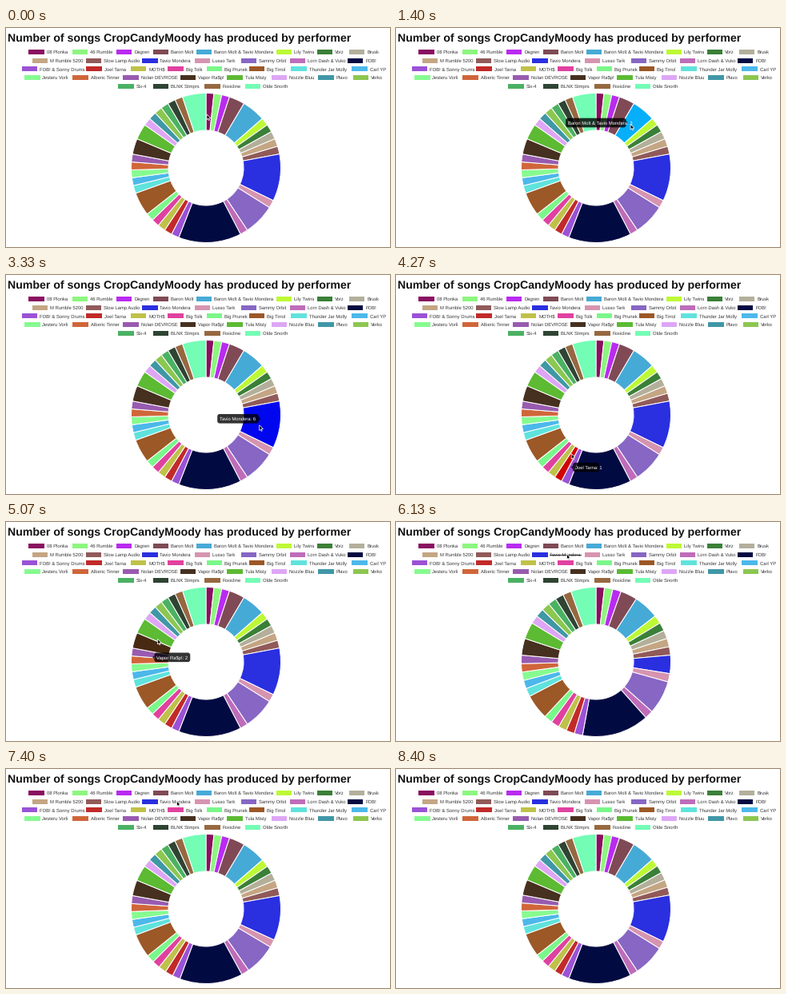
Animation, 480 px wide and 274 px high, one loop 8670 ms. Source, as a matplotlib script:

```python
import colorsys

import matplotlib.pyplot as plt
import numpy as np
from matplotlib.animation import FuncAnimation
from matplotlib.colors import to_rgb
from matplotlib.patches import FancyBboxPatch, Polygon, Rectangle, Wedge

plt.rcParams["font.family"] = "Liberation Sans"
plt.rcParams["text.hinting"] = "no_hinting"

W, H, DPI = 480, 274, 100
LOOP, STEP = 8670, 30
FRAMES = LOOP // STEP

CX, CY, R_OUT, R_IN = 250, 175, 93.5, 47
UNIT = 0.485  # stage pixels per chart pixel
FONT = 12 * UNIT
BOX_W, TEXT_DX = 40 * UNIT, 46 * UNIT
TIP_H, TIP_PAD, CARET, TIP_GAP = 24 * UNIT, 6 * UNIT, 5 * UNIT, 7 * UNIT

# name, colour, songs, left edge of the legend box
ROWS = [
    [("08 Plonka", "#8a1060", 1, 28.3), ("46 Rumble", "#8df67f", 1, 83.0),
     ("Dagren", "#b92bf0", 1, 137.9), ("Baron Molt", "#7f4a55", 2, 183.5),
     ("Baron Molt & Tavio Mondera", "#46aad6", 3, 237.9),
     ("Lily Twins", "#bdf935", 1, 337.8), ("Vorz", "#3a8038", 1, 388.6),
     ("Brusk", "#b3af9a", 1, 429.0)],
    [("M Rumble 5200", "#c4a684", 1, 32.7),
     ("Slow Lamp Audio", "#905a58", 1, 100.0),
     ("Tavio Mondera", "#2a2fe0", 6, 170.1),
     ("Lusso Tark", "#d694b0", 1, 235.8), ("Sammy Orbit", "#8766c4", 4, 294.0),
     ("Lorn Dash & Vuko", "#bf6cba", 1, 354.7), ("FOB!", "#020a42", 8, 426.9)],
    [("FOB! & Sonny Drums", "#9a52d6", 1, 19.6),
     ("Joel Tarna", "#c22a2a", 1, 100.2), ("MOTH$", "#bfc14a", 1, 155.9),
     ("Big Tolk", "#e0419f", 1, 202.2), ("Big Prunek", "#7af78a", 1, 250.7),
     ("Big Tirrol", "#9c5826", 3, 303.8),
     ("Thunder Jar Molly", "#5fe3dc", 1, 356.2),
     ("Carl YP", "#4cb8ea", 1, 432.2)],
    [("Jesteru Vorli", "#86fb90", 1, 23.1),
     ("Alberic Tinner", "#d0663a", 1, 83.3),
     ("Nolan DEVROSE", "#985bb0", 1, 146.4),
     ("Vapor Ra$p!", "#46301f", 2, 217.9), ("Tula Misty", "#5cba33", 2, 276.2),
     ("Nozzle Bluu", "#dea6f5", 1, 331.5), ("Plavo", "#4097a6", 1, 390.1),
     ("Verko", "#8cc751", 1, 433.8)],
    [("Six-4", "#4bb163", 1, 140.4), ("BLNK Stmprs", "#2f4433", 1, 183.8),
     ("Foxicline", "#966840", 1, 248.1), ("Olde Snorth", "#73fdb5", 3, 298.9)],
]
ITEMS = [item for row in ROWS for item in row]
SONGS = np.array([item[2] for item in ITEMS], float)
TOGGLED = 10
HIDE_AT, SHOW_AT = 5910, 6850

# time, x, y of the pointer tip
PATH = np.array([
    (0, 251, 108), (70, 251, 108), (530, 268, 110), (670, 268, 110),
    (730, 271, 111), (870, 271, 111), (1470, 297, 122), (1670, 297, 122),
    (2200, 307, 136.5), (2400, 311.5, 143.5), (2530, 314, 150),
    (2600, 314, 150), (2730, 315, 154), (3000, 315, 154), (3400, 317, 195),
    (3800, 268, 240), (3870, 268, 240), (4130, 221, 230), (4270, 219, 223),
    (4730, 186, 180), (4800, 186, 180), (5200, 191, 130), (5470, 212, 52),
    (5670, 212, 52), (5800, 213.5, 40), (7500, 213.5, 40), (7730, 95, 18),
    (7800, 95, 18), (8050, 4, 5), (8130, -15, -15),
])
ARROW = 0.95 * np.array([(0, 0), (0, 7), (1.6, 5.6), (2.7, 8), (3.8, 7.5),
                         (2.7, 5.2), (5, 5.1)])
HOVER_LAG, HOVER_MS = 70, 400


def px(size):
    return size * 72 / DPI


def ease(u):
    return 1 - (1 - min(max(u, 0), 1)) ** 4


def pointer(t):
    return np.array([np.interp(t, PATH[:, 0], PATH[:, k]) for k in (1, 2)])


def shares(t):
    """Part of the ring that each slice takes."""
    hidden = ease((t - HIDE_AT) / 1000) - ease((t - SHOW_AT) / 1000)
    rest = SONGS.copy()
    rest[TOGGLED] = 0
    return (1 - hidden) * SONGS / SONGS.sum() + hidden * rest / rest.sum()


def slice_at(x, y):
    dx, dy = x - CX, y - CY
    if not R_IN < np.hypot(dx, dy) < R_OUT:
        return None
    turn = np.arctan2(dx, -dy) / (2 * np.pi) % 1
    return int(np.searchsorted(np.cumsum(SONGS) / SONGS.sum(), turn))


def hover_colour(colour):
    h, l, s = colorsys.rgb_to_hls(*to_rgb(colour))
    return colorsys.hls_to_rgb(h, l * 0.9, min(1, s * 1.5))


fig = plt.figure(figsize=(W / DPI, H / DPI), dpi=DPI, facecolor="white")
ax = fig.add_axes([0, 0, 1, 1])
ax.set(xlim=(0, W), ylim=(H, 0))
ax.axis("off")


def label(x, y, text, size, **style):
    return ax.text(x, y, text, fontsize=px(size), va="baseline",
                   parse_math=False, **style)


label(2, 17, "Number of songs CropCandyMoody has produced by performer", 14.15,
      weight="bold", color="#111111")

for row, items in enumerate(ROWS):
    mid = 30 + 22 * UNIT * row
    for name, colour, _, left in items:
        ax.add_patch(Rectangle((left, mid - FONT / 2), BOX_W, FONT, fc=colour,
                               lw=0))
        text = label(left + TEXT_DX, mid + 2.1, name, FONT, color="#333333")
        if name == ITEMS[TOGGLED][0]:
            x0 = left + TEXT_DX
            x1 = x0 + text.get_window_extent().width
            strike, = ax.plot([x0, x1], [mid, mid], color="#333333",
                              lw=px(2 * UNIT))

wedges = [ax.add_patch(Wedge((CX, CY), R_OUT, 0, 1, width=R_OUT - R_IN,
                             fc=item[1], ec="white", lw=px(1)))
          for item in ITEMS]

tip_box = ax.add_patch(FancyBboxPatch(
    (0, 0), 20, TIP_H, boxstyle=f"round,pad=0,rounding_size={6 * UNIT}",
    fc="black", lw=0, zorder=5))
tip_caret = ax.add_patch(Polygon(np.zeros((3, 2)), fc="black", lw=0, zorder=5))
tip_text = label(0, 0, "", FONT, color="white", zorder=6)
arrow = ax.add_patch(Polygon(ARROW, fc="black", ec="white", lw=px(0.7),
                             zorder=9))


def tip_label(i):
    return f"{ITEMS[i][0]}: {ITEMS[i][2]}"


def tip_goal(i):
    """Left edge, middle height, width and opacity of a settled tooltip."""
    tip_text.set_text(tip_label(i))
    width = tip_text.get_window_extent().width + 2 * TIP_PAD
    angle = 2 * np.pi * (SONGS[:i].sum() + SONGS[i] / 2) / SONGS.sum()
    r = (R_OUT + R_IN) / 2
    x, y = CX + r * np.sin(angle), CY - r * np.cos(angle)
    left = x + TIP_GAP if x <= CX else x - TIP_GAP - width
    return np.array([left, y, width, 1])


def tip_track():
    """Hovered slice, labelled slice and tooltip state for every frame."""
    track = []
    hovered, shown, since = None, 0, 0
    state = start = goal = np.zeros(4)
    for t in range(0, LOOP, STEP):
        now = slice_at(*pointer(t - HOVER_LAG)) if t >= HOVER_LAG else None
        if now != hovered:
            start, since = state, t
            if now is None:
                goal = state * [1, 1, 1, 0]
            else:
                goal, shown = tip_goal(now), now
                if state[3] == 0:
                    start = goal * [1, 1, 1, 0]
            hovered = now
        state = start + (goal - start) * ease((t - since) / HOVER_MS)
        track.append((hovered, shown, state))
    return track


TRACK = tip_track()


def draw_tip(shown, state):
    left, y, width, alpha = state
    tip_box.set_bounds(left, y - TIP_H / 2, width, TIP_H)
    on_right = SONGS[:shown].sum() + SONGS[shown] / 2 < SONGS.sum() / 2
    base, out = (left + width, CARET) if on_right else (left, -CARET)
    tip_caret.set_xy([(base, y - CARET), (base + out, y), (base, y + CARET)])
    tip_text.set_text(tip_label(shown))
    tip_text.set_position((left + TIP_PAD, y + 2.1))
    for part in (tip_box, tip_caret):
        part.set_alpha(0.8 * alpha)
    tip_text.set_alpha(alpha)
    for part in (tip_box, tip_caret, tip_text):
        part.set_visible(alpha > 0.01)


def draw(n):
    t = n * STEP
    hovered, shown, state = TRACK[n]

    ends = 360 * np.cumsum(shares(t)) - 90
    begin = -90
    for i, (wedge, end) in enumerate(zip(wedges, ends)):
        wedge.set_theta1(begin)
        wedge.set_theta2(end)
        wedge.set_visible(end - begin > 0.05)
        colour = ITEMS[i][1]
        wedge.set_facecolor(hover_colour(colour) if i == hovered else colour)
        begin = end

    strike.set_visible(HIDE_AT <= t < SHOW_AT)
    draw_tip(shown, state)
    arrow.set_xy(ARROW + pointer(t))
    return []


anim = FuncAnimation(fig, draw, frames=FRAMES, interval=STEP, repeat=True,
                     repeat_delay=0, blit=False)
plt.show()
```
